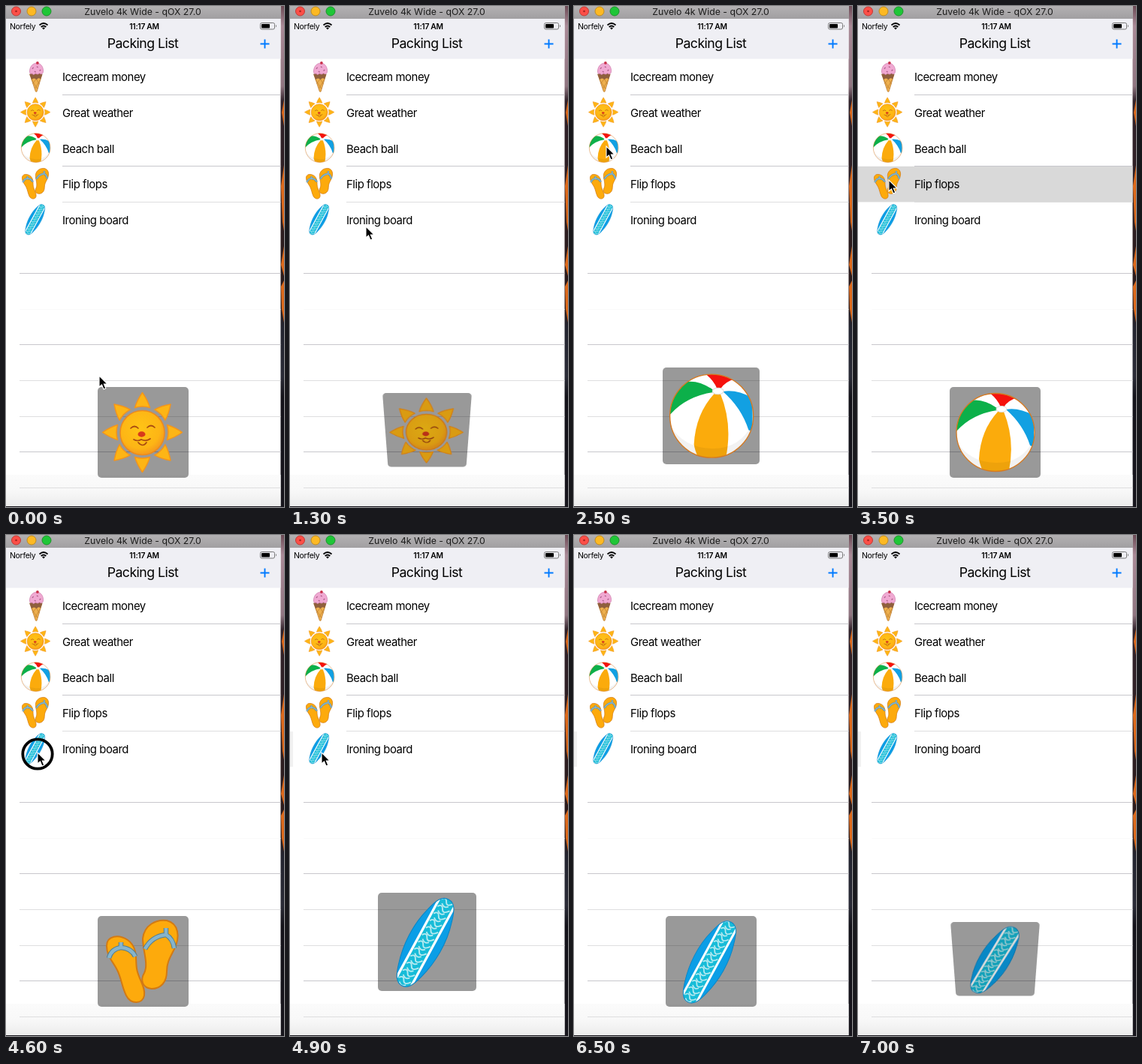
Recreate the animation shown at these times as an HTML page. Size 370 by 668 pixels, loop 7100 ms.

```html
<!DOCTYPE html>
<html lang="en">
<head>
<meta charset="utf-8">
<title>Packing List</title>
<style>
  html, body { margin: 0; width: 100%; height: 100%; overflow: hidden; background: #fff; }
  body { position: relative; }
  svg { display: block; font-family: Inter, sans-serif; }
  #screen, #pointer { position: absolute; left: 0; top: 0; }
  #panel { position: absolute; background: rgba(0, 0, 0, .4); border-radius: 5px; overflow: hidden; }
  .tight { letter-spacing: -.03em; }
</style>
</head>
<body>
<svg id="screen" width="370" height="668">
  <defs>
    <linearGradient id="bar" x2="0" y2="1"><stop stop-color="#b3b1b3"/><stop offset="1" stop-color="#a19fa1"/></linearGradient>
    <linearGradient id="foot" x2="0" y2="1"><stop stop-color="#fbfbfb"/><stop offset=".5" stop-color="#f8f8f8"/><stop offset="1" stop-color="#ececec"/></linearGradient>
    <linearGradient id="desk" x2="0" y2="1">
      <stop stop-color="#6b4a55"/><stop offset=".04" stop-color="#a98a97"/><stop offset=".16" stop-color="#8f7580"/>
      <stop offset=".19" stop-color="#30222a"/><stop offset=".6" stop-color="#2a1a1a"/><stop offset=".64" stop-color="#23242f"/>
      <stop offset=".74" stop-color="#2a2b36"/><stop offset=".78" stop-color="#131219"/><stop offset="1" stop-color="#17151c"/>
    </linearGradient>
    <radialGradient id="face" cx=".45" cy=".4" r=".6"><stop stop-color="#ffc416"/><stop offset=".75" stop-color="#fdb515"/><stop offset="1" stop-color="#f59a1d"/></radialGradient>
    <clipPath id="ballClip"><circle cx="61" cy="60.5" r="52"/></clipPath>
    <clipPath id="boardClip"><path id="boardShape" d="M0-60C9-60 13-52 17-36C24-12 23 16 16 40C12 54 8 61 0 61C-8 61-12 54-16 40C-23 16-24-12-17-36C-13-52-9-60 0-60Z"/></clipPath>

    <symbol id="cone" viewBox="0 0 121 121">
      <path d="M40 54H83L65 114Q63 117 60 114Z" fill="#eeb04e" stroke="#b5752c" stroke-width="2"/>
      <path d="M46 72 66 104M58 62 74 88M78 70 58 104M68 62 50 86" stroke="#c98a38" stroke-width="2.500"/>
      <path d="M38 52Q60 44 85 52L78 70Q70 62 64 72Q54 62 46 72Z" fill="#8f5f3d"/>
      <path d="M39 46C38 26 48 14 64 12C80 13 90 28 87 46Q82 56 74 49Q68 56 60 50Q52 58 47 50Q42 54 39 46Z" fill="#f0a9d2" stroke="#cf7fae" stroke-width="2"/>
      <path d="M48 33 53 28M64 25 69 28M74 40 79 36M56 42 61 45" stroke="#b0608c" stroke-width="3.500"/>
      <circle cx="67" cy="12" r="5" fill="#c9304a"/>
    </symbol>
    <symbol id="sun" viewBox="0 0 121 121">
      <g id="rays" fill="#fdb515" stroke="#f3951c" stroke-width="1.5" stroke-linejoin="round"></g>
      <circle cx="59.5" cy="61" r="29.5" fill="url(#face)" stroke="#ee8a1c" stroke-width="1.5"/>
      <path d="M44 55Q49 50 54 55M66 54Q71 49 76 54M48 70Q53 73 58 70Q65 73 70 69M54 74Q60 81 65 74" fill="none" stroke="#a84a10" stroke-width="1.700" stroke-linecap="round"/>
      <ellipse cx="58.500" cy="63" rx="5" ry="3.700" fill="#d8391b"/>
    </symbol>
    <symbol id="ball" viewBox="0 0 121 121">
      <circle cx="61" cy="60.5" r="52" fill="#fff"/>
      <g clip-path="url(#ballClip)">
        <path d="M68 27Q64 16 51 6H90V14Q77 18 72 27Z" fill="#f5120d"/>
        <path d="M75 30Q92 27 112 38V80L107 78Q98 50 75 30Z" fill="#12a0e2"/>
        <path d="M64 33Q41 58 39 96Q40 104 46 116H78Q88 72 72 33Z" fill="#fbab0c"/>
        <path d="M63 28Q45 15 28 18L6 40V60L10 58Q30 36 63 31Z" fill="#0cb04a"/>
        <path d="M9 72Q26 100 61 101T112 70V115H9Z" fill="#000" opacity=".05"/>
      </g>
      <ellipse cx="69" cy="29.500" rx="7" ry="4" fill="#fff" stroke="#ddd"/>
      <circle cx="61" cy="60.5" r="52" fill="none" stroke="#d57a22" stroke-width="1.3"/>
    </symbol>
    <symbol id="flops" viewBox="0 0 121 121">
      <g fill="#fdaa0c" stroke="#d27a14" stroke-width="2">
        <path d="M12 40C12 26 28 24 40 32C54 42 50 58 52 70C54 84 64 94 62 106C60 118 44 118 38 106C32 94 32 84 26 72C20 60 12 54 12 40Z"/>
        <path d="M60 30C62 12 78 4 92 6C108 10 110 28 102 44C96 56 92 62 92 74C92 88 84 97 72 97C60 96 56 86 62 76C68 64 60 46 60 30Z"/>
      </g>
      <g fill="none" stroke-linejoin="round">
        <path id="strap" d="M15 56Q18 44 31 42Q45 43 50 54M31 42V35M63 44Q72 27 91 25Q100 30 102 43M91 25V16" stroke="#4f7d95" stroke-width="6.500"/>
        <path d="M15 56Q18 44 31 42Q45 43 50 54M31 42V35M63 44Q72 27 91 25Q100 30 102 43M91 25V16" stroke="#86b4cb" stroke-width="4.500"/>
      </g>
    </symbol>
    <symbol id="board" viewBox="0 0 121 121">
      <g transform="translate(58.5 61) rotate(28.5)">
        <g clip-path="url(#boardClip)">
          <path d="M-30-65H30V65H-30Z" fill="#0b9ee6"/>
          <path d="M-12-65H12V65H-12Z" fill="#fff"/>
          <path d="M-9-65H9V65H-9Z" fill="#17bcd8"/>
          <g id="waves" fill="none" stroke="#b5eaf0" stroke-width="1.700"></g>
        </g>
        <use href="#boardShape" fill="none" stroke="#0a86c6"/>
      </g>
    </symbol>
  </defs>

  <rect width="370" height="668" fill="url(#desk)"/>
  <path d="M370 125L367 142 370 160ZM370 212L366 240 368 288 370 300ZM370 320L366 345 370 360ZM366 374L370 366V422L367 404Z" fill="#dd6a1c"/>
  <rect width="365.500" height="667" fill="#fff"/>
  <rect y="625" width="365.500" height="42" fill="url(#foot)"/>
  <rect y="17" width="365.500" height="53.500" fill="#efeff4"/>
  <rect width="366" height="17" fill="url(#bar)"/>
  <g stroke-width="1">
    <circle cx="13.500" cy="7" r="6" fill="#fc4f48" stroke="#c23a35"/>
    <circle cx="34" cy="7" r="6" fill="#fdb924" stroke="#c08c20"/>
    <circle cx="54" cy="7" r="6" fill="#1fc637" stroke="#1c912b"/>
  </g>
  <circle cx="13.500" cy="7" r="1.300" fill="#a02520"/>
  <text x="182" y="12" font-size="12.300" fill="#1c1c1c" text-anchor="middle">Zuvelo 4k Wide - qOX 27.0</text>
  <text x="5" y="31" font-size="10.500" class="tight">Norfely</text>
  <g fill="none" stroke="#000" stroke-width="1.800">
    <path d="M44.500 25.500Q50 20.500 55.500 25.500M46.700 28Q50 25 53.300 28"/>
  </g>
  <path d="M48 29.300Q50 27.700 52 29.300L50 31.500Z"/>
  <text x="184" y="31" font-size="10.300" font-weight="600" text-anchor="middle" class="tight">11:17 AM</text>
  <rect x="338.500" y="22.500" width="19" height="8.500" rx="2" fill="none" stroke="#777"/>
  <rect x="340" y="24" width="11" height="5.500" rx=".8"/>
  <path d="M359 25Q361 26.700 359 28.500Z" fill="#777"/>
  <text x="182" y="55.500" font-size="17.700" text-anchor="middle" class="tight">Packing List</text>
  <path d="M338.500 50.500H350.500M344.500 44.500V56.500" stroke="#007aff" stroke-width="1.900"/>
  <rect id="highlight" width="365.500" height="47.600" fill="#d9d9d9"/>
  <rect id="sliver" y="262" width="4" height="47" fill="#f1f1f1"/>
  <g id="list"></g>
</svg>

<div id="panel"><svg id="art" width="100%" height="100%" viewBox="0 0 121 121"><use id="picture"/></svg></div>

<svg id="pointer" width="370" height="668">
  <g id="cursor">
    <circle id="ring" cy="2" r="19.700" fill="none" stroke="#000" stroke-width="3.800"/>
    <path d="M0 0V15L3.500 12 6 18 8.800 16.800 6.300 11H11Z" stroke="#fff" stroke-width="1.100"/>
  </g>
</svg>

<script>
const $ = id => document.getElementById(id);
const LOOP = 7100, STEP = 100, ROW = 47.6, TOP = 71, SIZE = 121, SMALL = 71;
const HOLD = 2050, FLIP = 1000;
const items = [['cone', 'Icecream money'], ['sun', 'Great weather'], ['ball', 'Beach ball'],
  ['flops', 'Flip flops'], ['board', 'Ironing board']];
const taps = [{ at: -1000, row: 1 }, { at: 2290, row: 2 }, { at: 3530, row: 3 }, { at: 4700, row: 4 }];
// time, x, y
const path = [[0, 124, 493], [1300, 101, 294], [2000, 43, 187], [2500, 43, 187], [3250, 41, 232],
  [3700, 41, 232], [4400, 42, 290], [4900, 42, 290], [5600, 54, 281], [5800, 54, 281], [6500, 390, 215]];

$('rays').innerHTML = Array.from({ length: 8 }, (_, i) =>
  `<path d="M0-53Q7-43 10-33Q0-36-10-33Q-7-43 0-53Z" transform="translate(59.500 60.500) rotate(${i * 45})"/>`).join('');
$('waves').innerHTML = Array.from({ length: 12 }, (_, i) =>
  `<path d="M-8 ${i * 10 - 56}q4-6 7 0t9-2M-5 ${i * 10 - 52}q5 5 9 0"/>`).join('');

const line = (k, color) => {
  const x = k < 6 ? 75 : 18, y = Math.floor(TOP + k * ROW) + .5;
  return `<path d="M${x} ${y}H365.500" stroke="${color}"/>`;
};
$('list').innerHTML =
  [1, 3, 6, 8, 11].map(k => line(k, '#c8c7cc')).join('') +
  [4, 9, 10, 12].map(k => line(k, '#dededf')).join('') + line(7, '#fafafa') +
  items.map(([icon, label], i) =>
    `<use href="#${icon}" x="17" y="${71.5 + i * ROW}" width="45" height="45"/>
     <text x="75" y="${100.3 + i * ROW}" font-size="14.900" class="tight">${label}</text>`).join('');

const clamp = v => Math.min(1, Math.max(0, v));
const smooth = v => v * v * (3 - 2 * v);
const mix = (a, b, p) => a + (b - a) * p;

function spring(s) {
  const damping = .4, w = 21, wd = w * Math.sqrt(1 - damping ** 2), decay = damping * w;
  return 1 - Math.exp(-decay * s) * (Math.cos(wd * s) + decay / wd * Math.sin(wd * s));
}

function drawPanel(t) {
  const tap = taps.filter(p => p.at <= t).pop();
  const age = t - tap.at, rise = spring(age / 1000);
  const angle = Math.PI * smooth(clamp((age - HOLD) / FLIP));
  const size = mix(SMALL, SIZE, rise), bottom = mix(738, 629, rise), lean = Math.sin(angle);
  const style = $('panel').style;
  style.display = angle < Math.PI / 2 ? 'block' : 'none';
  style.width = style.height = size + 'px';
  style.left = 182.5 - size / 2 + 'px';
  style.top = bottom - size + 'px';
  style.transform = angle ? `perspective(393px) translateZ(${-75 * lean}px) rotateX(${-angle}rad)` : 'none';
  $('art').style.filter = `brightness(${1 - .3 * lean})`;
  $('picture').setAttribute('href', '#' + items[tap.row][0]);
}

function drawTouch(t) {
  const tap = taps.find(p => t >= p.at - 150 && t < p.at + 160);
  const age = tap ? t - tap.at : -999;
  $('ring').style.opacity = age >= -150 && age < -40 ? 1 : 0;
  $('highlight').style.opacity = age >= -80 ? 1 - clamp(age / 150) : 0;
  $('highlight').setAttribute('y', TOP + (tap ? tap.row : 0) * ROW);
  $('sliver').style.opacity = t >= 4800 ? 1 : 0;
}

function drawCursor(t) {
  const next = path.findIndex(p => p[0] > t);
  const b = path[next < 0 ? path.length - 1 : next], a = path[next < 0 ? path.length - 1 : next - 1];
  const p = smooth(clamp((t - a[0]) / (b[0] - a[0] || 1)));
  $('cursor').setAttribute('transform', `translate(${mix(a[1], b[1], p)} ${mix(a[2], b[2], p)})`);
}

const start = performance.now();
function frame() {
  const t = Math.floor((performance.now() - start) % LOOP / STEP) * STEP;
  drawPanel(t);
  drawTouch(t);
  drawCursor(t);
  requestAnimationFrame(frame);
}
frame();
</script>
</body>
</html>
```
